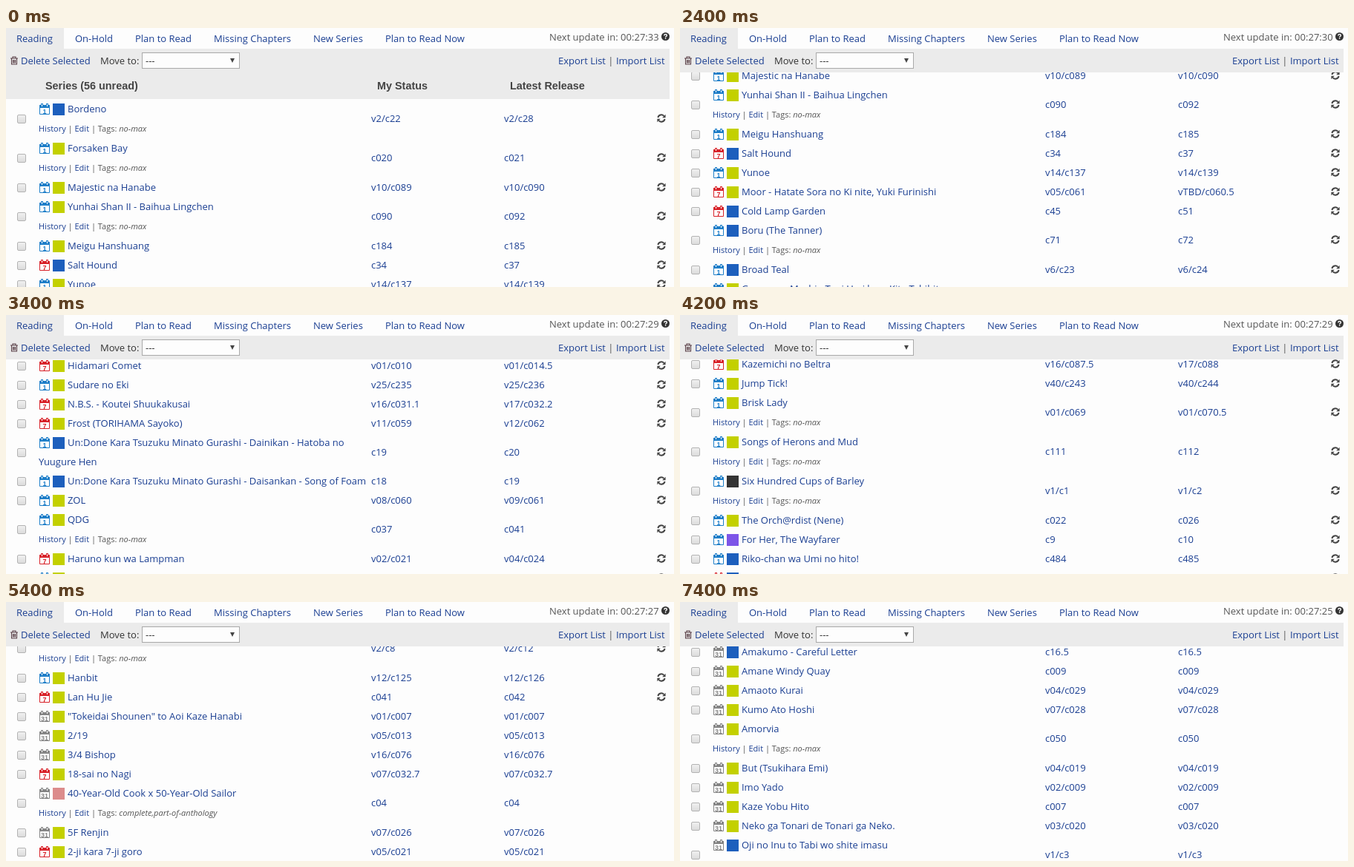
An HTML page that plays this animation: 900x350 px, repeating every 7800 ms.

```html
<!DOCTYPE html>
<html lang="en">
<head>
<meta charset="utf-8">
<title>Reading list</title>
<style>
html, body { margin: 0; width: 100%; height: 100%; overflow: hidden; background: #fdfdfd; }
body { position: relative; font: 13px/26px "Open Sans", "Noto Sans", sans-serif; color: #1b3f92; }
#stage { position: absolute; left: 0; top: 0; width: 900px; height: 350px; overflow: hidden; }
#stage div, #stage span, #stage svg { position: absolute; white-space: pre; }
#list { left: 0; top: 0; width: 900px; will-change: transform; }
.row { left: 0; width: 900px; }
.grey { background: #ebebeb; left: 0; width: 894px; }
.head { font: bold 14.4px/36px "Liberation Sans", Arial, sans-serif; color: #444; top: 0; }
.dark { color: #333; }
.soft { color: #555; }
.box { left: 15px; width: 10px; height: 10px; border: 1px solid #b3b3b3; border-radius: 2px; background: linear-gradient(#f0f0f0, #dcdcdc); }
.mark { left: 63px; top: 6px; width: 16px; height: 16px; }
.notes { left: 44px; top: 27px; font-size: 11px; }
#stage .notes i, #stage .notes b { position: static; font-weight: normal; color: #555; }
#bar { left: 0; top: 0; width: 900px; height: 60px; background: #fdfdfd; }
#choice { left: 183px; top: 33px; width: 130px; height: 20px; border: 1px solid #a9a9a9; background: #fdfdfd; }
</style>
</head>
<body>
<div id="stage">
  <div id="list"></div>
  <div id="bar">
    <div class="grey" style="top:28px;height:32px"></div>
    <div class="grey" style="top:0;height:28px;width:78px"></div>
    <div id="choice"></div>
    <svg width="900" height="60" style="left:0;top:0">
      <path d="M302 41h6l-3 6z" fill="#444"/>
      <path d="M6 41h10M9 40.500v-1.500h4v1.500M7.500 41.500v7.500h7v-7.500M9.500 43v4.500M11 43v4.500M12.500 43v4.500" fill="none" stroke="#5a4048" stroke-width="1.100"/>
      <circle cx="888.500" cy="11.500" r="5.500" fill="#333"/>
      <path d="M886.700 10.300q.2-1.800 1.900-1.800t1.800 1.500q0 .9-1.100 1.500-.7.400-.7 1.300M888.600 13.500v1.600" fill="none" stroke="#fff" stroke-width="1.400"/>
    </svg>
  </div>
</div>
<script>
// Lines: calendar + site, title|status|latest|tags. "@step,y" pins the next title to a scroll step; "*n" adds n rows.
const DATA = `
@0,109
1b Bordeno|v2/c22|v2/c28|+
1u Forsaken Bay|c020|c021|+
@3,64
1u Majestic na Hanabe|v10/c089|v10/c090
1u Yunhai Shan II - Baihua Lingchen|c090|c092|+
1u Meigu Hanshuang|c184|c185
7b Salt Hound|c34|c37
1u Yunoe|v14/c137|v14/c139
7u Moor - Hatate Sora no Ki nite, Yuki Furinishi|v05/c061|vTBD/c060.5
7b Cold Lamp Garden|c45|c51
1b Boru (The Tanner)|c71|c72|+
1b Broad Teal|v6/c23|v6/c24
1u Garasu na Machi - Tooi Umi kara Kita Tabibito wa^Yume no Kakera wo Sagasu|v01/c004|v01/c005
*10
@8,68
7u Hidamari Comet|v01/c010|v01/c014.5
1u Sudare no Eki|v25/c235|v25/c236
7u N.B.S. - Koutei Shuukakusai|v16/c031.1|v17/c032.2
7u Frost (TORIHAMA Sayoko)|v11/c059|v12/c062
1b Un:Done Kara Tsuzuku Minato Gurashi - Dainikan - Hatoba no^Yuugure Hen|c19|c20
1b Un:Done Kara Tsuzuku Minato Gurashi - Daisankan - Song of Foam|c18|c19
1u ZOL|v08/c060|v09/c061
1u QDG|c037|c041|+
7u Haruno kun wa Lampman|v02/c021|v04/c024
*5
@12,66
7u Kazemichi no Beltra|v16/c087.5|v17/c088
1u Jump Tick!|v40/c243|v40/c244
1u Brisk Lady|v01/c069|v01/c070.5|+
1u Songs of Herons and Mud|c111|c112|+
1h Six Hundred Cups of Barley|v1/c1|v1/c2|+
1u The Orch@rdist (Nene)|c022|c026
1s For Her, The Wayfarer|c9|c10
1b Riko-chan wa Umi no hito!|c484|c485
*9
@18,49
1b Yoake Tobira|v2/c8|v2/c12|+
1u Hanbit|v12/c125|v12/c126
7u Lan Hu Jie|c041|c042
31u "Tokeidai Shounen" to Aoi Kaze Hanabi|v01/c007
31u 2/19|v05/c013
31u 3/4 Bishop|v16/c076
7u 18-sai no Nagi|v07/c032.7
31p 40-Year-Old Cook x 50-Year-Old Sailor|c04||complete,part-of-anthology
31u 5F Renjin|v07/c026
7u 2-ji kara 7-ji goro|v05/c021
*7
@23,71
1u Ao Minatobitotachi no Yofukashi|c100
31u Aogasa no Hoshimiyohime|v16/c082
31u Asatsuyu no Suzu|v01/c005
1u Asatsuyu no Rena|v24/c135
31u QLV62 - Yagai Soukou Kiji|v25/c217
31b QLV62 - Yagai Soukou Kiji|v25/c217
1b Aki no Hisashi|c49||+
31b Amayaka Marionet|v1/c1
31u All Along Cape-Fern - Winterlaube no Hibikigoe|v03/c011
1b All Noon Ha Sebin|c17||+
@26,67
31b Amakumo - Careful Letter|c16.5
31u Amane Windy Quay|c009
31u Amaoto Kurai|v04/c029
31u Kumo Ato Hoshi|v07/c028
31u Amorvia|c050||+
31u But (Tsukihara Emi)|v04/c019
31u Imo Yado|v02/c009
31u Kaze Yobu Hito|c007
31u Neko ga Tonari de Tonari ga Neko.|v03/c020
31b Oji no Inu to Tabi wo shite imasu|v1/c3||+
31u Anzu Batake|v02/c011`;

const SITES = { u: '#c3d000', b: '#1d5fbd', h: '#333', s: '#7d55e8', p: '#dc8c8c' };
const CALENDARS = { 1: '#1e7ec8', 7: '#d8232a', 31: '#858585' };
const FIRST = ['Hozuki', 'Irori', 'Kagerou', 'Komorebi', 'Mizuiro', 'Nagisa', 'Orizuru'];
const LAST = ['Tsuribito', 'Kaidan', 'Hakoniwa', 'Tegami', 'Yorimichi'];
const list = document.getElementById('list');
const bar = document.getElementById('bar');
const pins = [];
let nextTop = 96, fillers = 0;

const text = (x, y, content, cls = '') => `<span class="${cls}" style="left:${x}px;top:${y}px">${content}</span>`;

const calendar = day => `<svg width="16" height="16" style="left:44px;top:6px">
  <path d="M1.500 3.500h13v11h-13z" fill="#fff" stroke="${CALENDARS[day]}"/>
  <path d="M1 2h14v4h-14zM3 0h3v3h-3zM10 0h3v3h-3z" fill="${CALENDARS[day]}"/>
  <path d="M4.500 1v3M11.500 1v3" stroke="#fff"/>
  <text x="8" y="13.500" text-anchor="middle" font-family="Liberation Sans, sans-serif" font-weight="bold" font-size="9" fill="${CALENDARS[day]}">${day}</text></svg>`;

const refresh = y => `<svg width="12" height="12" viewBox="-6 -6 12 12" style="left:877px;top:${y - 6}px">
  <path d="M-4.600-1A4.600 4.600 0 0 1 3.400-3.100M4.600 1A4.600 4.600 0 0 1-3.400 3.100" fill="none" stroke="#444" stroke-width="2"/>
  <path d="M5.600-5.200v4.400h-4.400zM-5.600 5.200v-4.400h4.400z" fill="#444"/></svg>`;

function addRow(day, site, title, status, latest, tags) {
  const lines = title.split('^');
  const height = tags ? 53 : 26 * lines.length;
  const middle = Math.floor(height / 2);
  const label = tags === '+' ? 'no-max' : tags;
  list.insertAdjacentHTML('beforeend', `<div class="row" style="top:${nextTop}px;height:${height}px">
    <div class="box" style="top:${middle - 5}px"></div>${calendar(day)}
    <div class="mark" style="background:${SITES[site]}"></div>` +
    text(83, 0, lines[0]) + (lines[1] ? text(44, 26, lines[1]) : '') +
    (tags ? `<div class="notes">History <b>|</b> Edit <b>| Tags: </b><i>${label}</i></div>` : '') +
    text(492, middle - 13, status) + text(671, middle - 13, latest || status) +
    (latest ? refresh(middle) : '') + '</div>');
  nextTop += height;
}

function addFillers(count, unread) {
  for (let i = 0; i < count; i++) {
    const n = fillers++, chapter = 17 + n * 37 % 90;
    const name = c => `v0${1 + n % 8}/c${String(c).padStart(3, '0')}`;
    const day = n % 3 === 0 ? 7 : unread ? 1 : 31;
    addRow(day, n % 4 === 3 ? 'b' : 'u', `${FIRST[n % 7]} no ${LAST[n * 3 % 5]}`,
      name(chapter), unread && name(chapter + 1), i % 4 === 2 ? '+' : '');
  }
}

list.innerHTML = '<div class="grey" style="top:60px;height:36px">' +
  text(53, 0, 'Series (56 unread)', 'head') + text(500, 0, 'My Status', 'head') + text(679, 0, 'Latest Release', 'head') + '</div>';

for (const line of DATA.trim().split('\n')) {
  if (line[0] === '@') {
    const [step, y] = line.slice(1).split(',').map(Number);
    pins.push({ step, scroll: nextTop + 13 - y });
  } else if (line[0] === '*') {
    addFillers(+line.slice(1), pins.length < 5);
  } else {
    const [, day, site, rest] = line.match(/^(\d+)(\w) (.*)$/);
    addRow(day, site, ...rest.split('|'));
  }
}

bar.insertAdjacentHTML('beforeend',
  [[14, 'Reading'], [93, 'On-Hold'], [174, 'Plan to Read'], [280, 'Missing Chapters'], [414, 'New Series'], [511, 'Plan to Read Now']]
    .map(([x, label]) => text(x, 1, label)).join('') +
  text(20, 31, 'Delete Selected') + text(127, 31, 'Move to:', 'dark') + text(188, 31, '---', 'dark') +
  text(744, 31, 'Export List <span class="soft" style="position:static">|</span> Import List') +
  text(732, -1, '', 'soft clock'));
const clock = bar.querySelector('.clock');

function scrollAt(step) {
  const i = Math.max(1, pins.findIndex(pin => pin.step >= step));
  const from = pins[i - 1], to = pins[i];
  const part = (step - from.step) / (to.step - from.step);
  return from.scroll + (to.scroll - from.scroll) * (i === 1 ? part ** 1.5 : part);
}

function draw() {
  const t = performance.now() % 7800;
  const step = Math.min(26, Math.max(0, Math.floor((t - 1800) / 200)));
  list.style.transform = `translateY(${-Math.round(scrollAt(step))}px)`;
  clock.textContent = `Next update in: 00:27:${33 - Math.floor((t + 600) / 1000)}`;
  requestAnimationFrame(draw);
}
draw();
</script>
</body>
</html>
```
